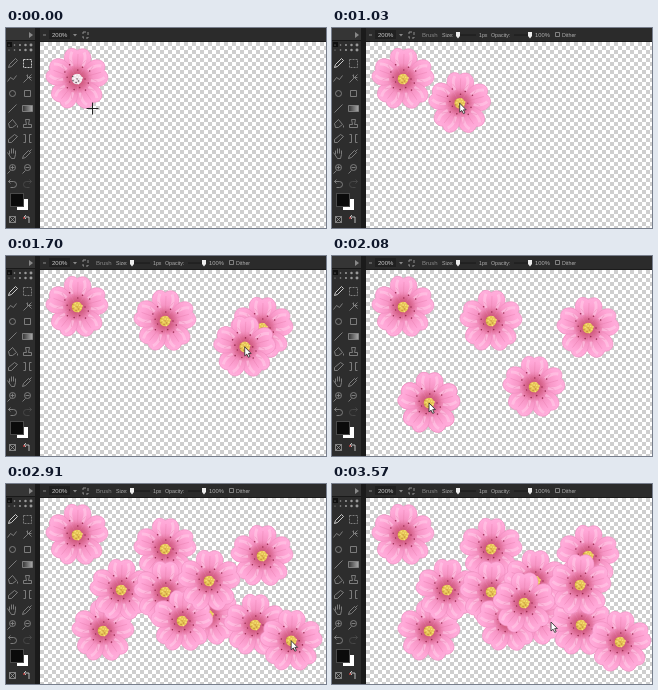
An HTML page with a canvas for the animation above (3600 ms loop, 320 by 200 pixels).

```html
<!DOCTYPE html>
<html lang="en">
<head>
<meta charset="utf-8">
<title>Flower brush</title>
<style>
html, body { margin: 0; width: 100%; height: 100%; overflow: hidden; background: #222; }
canvas { display: block; width: 320px; height: 200px; }
</style>
</head>
<body>
<canvas id="stage" width="320" height="200"></canvas>
<script>
const g = document.getElementById('stage').getContext('2d');
const LOOP = 3600, STEP = 74.4, PRESS = 260, RELEASE = 800, BRUSH = 960, END = 3560;
const LEFT = 34, TOP = 14, GOLDEN = 2.4;

// flowers in the order they are stamped; a marked one is only hovered
const spots = [
  [159, 65], [256, 72], [202, 131], [97, 147], [115, 106], [159, 108], [176, 137],
  [203, 97], [249, 141], [288, 158], [248, 101], [120, 83, 'hover'], [192, 119]
];
// the first stamps are slow, the rest come in a quick steady beat
const arrival = i => 2080 + (i - 3) * (i < 3 ? 240 : 140);
const opening = [[0, 87, 80], [PRESS, 35, 14], [670, 104, 76], [RELEASE, 104, 83]];
const stops = [...opening, ...spots.map(([x, y], i) => [arrival(i), x, y])];

const petal = new Path2D('M0 0C-4-6-15-13-13.5-23C-12-31-5-32-1-28.5C4-32 11-31 13-23C15-13 4-6 0 0Z');
const shine = new Path2D('M-6-27Q-9-21-5-13M6-27Q9-21 5-13');
const veins = new Path2D('M0-9V-25M-2-9Q-3-15-8-19M2-9Q3-15 8-19');
const arrow = new Path2D('M0 0V9L2.1 7.2L3.7 10.4L5.2 9.7L3.7 6.6H6.4Z');

// tool glyphs around their own centre, two per row
const lens = 'M3-1A3 3 0 1 1-3-1A3 3 0 1 1 3-1M-2 2L-5 5M-2-1H2';
const undo = 'M-4-2H1A3 3 0 0 1 1 4H-2M-2-4L-4-2L-2 0';
const glyphs = [
  'M-4 4L-3 1L3-5L5-3L-1 3Z', 'M-4-4H4V4H-4Z',
  'M-5 3L-2-1L1 1L4-3', 'M-4 4L4-4M-1-3L4 2M4-1H0V-4',
  'M-3 0A3 3 0 1 1 3 0A3 3 0 1 1-3 0', 'M-3-3H3V3H-3Z',
  'M-4 4L4-4', 'M-5-3H5V3H-5Z',
  'M-4 0L0-4L4 1L0 4H-3ZM5 2V4', 'M-4 4H4V1H1L2-4H-2L-1 1H-4Z',
  'M-4 4V1L2-4L5-2L-1 4Z', 'M-4-4H-2V4H-4M4-4H2V4H4',
  'M-5-1L-1 5H2L3 1V-3M-3 1V-3M-1 0V-5M1 0V-5', 'M-5 5L-4 2L1-3L3-1L-2 4ZM2-2L4-4',
  lens + 'M0-3V1', lens, undo, undo
].map(d => new Path2D(d));

function box(x, y, w, h, color) {
  g.fillStyle = color;
  g.fillRect(x, y, w, h);
}

function dot(x, y, r, color) {
  g.fillStyle = color;
  g.beginPath();
  g.arc(x, y, r, 0, 7);
  g.fill();
}

function stroke(shape, color, width = 1) {
  g.strokeStyle = color;
  g.lineWidth = width;
  g.stroke(typeof shape === 'string' ? new Path2D(shape) : shape);
}

function fill(shape, color) {
  g.fillStyle = color;
  g.fill(typeof shape === 'string' ? new Path2D(shape) : shape);
}

function label(s, x, size, color = '#b0b0b0') {
  g.font = size + 'px "Liberation Sans", sans-serif';
  g.fillStyle = color;
  g.fillText(s, x, 9);
}

function radial(r, ...colors) {
  const grad = g.createRadialGradient(0, 0, 0, 0, 0, r);
  colors.forEach((c, i) => grad.addColorStop(i / (colors.length - 1), c));
  return grad;
}

const petalFill = radial(32, '#c23c68', '#df7099', '#f796c6', '#ffa6d6', '#ffb0dd');
const heart = radial(13, '#c84a6c', '#d05c80bb', '#d9608e00');

function flower(x, y, yellow = true) {
  g.save();
  g.translate(x, y);
  for (let i = 0; i < 5; i++) {
    g.save();
    g.rotate(i * Math.PI * .4 + .04);
    fill(petal, petalFill);
    stroke(petal, '#ee8dbf', .6);
    stroke(shine, '#ffd0ea88', 3);
    stroke(veins, '#e276a688', .6);
    g.restore();
  }
  dot(0, 0, 13, heart);
  for (let i = 0; i < 13; i++) {
    const r = 8 + i * 5 % 9;
    dot(Math.cos(i * GOLDEN) * r, Math.sin(i * GOLDEN) * r, .8, '#9c2e54');
  }
  const [base, light, dark] = yellow ? ['#e6c455', '#f8e37c', '#c4913f'] : ['#eee4e8', '#fff', '#65515a'];
  dot(0, 0, 5.3, base);
  for (let i = 0; i < 14; i++) {
    const r = 1.45 * Math.sqrt(i);
    dot(Math.cos(i * GOLDEN) * r, Math.sin(i * GOLDEN) * r, .8, i % 3 ? light : dark);
  }
  g.restore();
}

// between two spots the pointer rests, travels, then rests again
function pointer(t) {
  if (t >= END) return [219, 138];
  const i = stops.findIndex(s => s[0] > t);
  if (i < 0) return stops.at(-1).slice(1);
  const [t0, x0, y0] = stops[i - 1], [t1, x1, y1] = stops[i];
  let u = (t - t0) / (t1 - t0);
  if (i > opening.length) u = Math.min(1, Math.max(0, (u - .25) * 1.5));
  return [x0 + (x1 - x0) * u, y0 + (y1 - y0) * u];
}

function checker() {
  box(LEFT, TOP, 286, 186, '#fff');
  for (let y = 0; y < 47; y++)
    for (let x = y % 2; x < 72; x += 2) box(LEFT + x * 4, TOP + y * 4, 4, 4, '#cecece');
}

function selection(x, y) {
  const w = x - 35, h = y - TOP;
  if (w < 2 || h < 2) return;
  const frame = `M35.5 14.5h${w}v${h}h${-w}Z`;
  stroke(frame, '#fff');
  g.setLineDash([2, 2]);
  stroke(frame, '#111');
  g.setLineDash([]);
  for (const i of [0, .5, 1])
    for (const j of [0, .5, 1])
      if (i !== .5 || j !== .5) box(Math.round(33.5 + w * i), Math.round(12.5 + h * j), 4, 4, '#080808');
}

function sidebar(brush) {
  box(0, 0, LEFT, 200, '#1b1b1b');
  box(0, 0, 29, 200, '#2d2d2d');
  box(0, 0, 29, 12, '#353535');
  box(0, 12, 29, 1, '#191919');
  fill('M23 4L27 7L23 10Z', '#888');
  box(1, 14, 5, 5, '#101010');
  for (let i = 0; i < 10; i++)
    dot(3 + i % 5 * 5.5, i < 5 ? 17 : 22, .6 + i % 5 * .22, '#999');
  glyphs.forEach((glyph, i) => {
    const active = i === (brush ? 0 : 1), redo = i === 17;
    g.save();
    g.translate(i % 2 ? 21.5 : 6.5, 35.5 + 15 * (i >> 1));
    if (redo) g.scale(-1, 1);
    if (i === 1) g.setLineDash([2, 1]);
    if (i === 7) {
      const ramp = g.createLinearGradient(-5, 0, 5, 0);
      ramp.addColorStop(0, '#333');
      ramp.addColorStop(1, '#aaa');
      fill(glyph, ramp);
    }
    stroke(glyph, active ? '#ddd' : redo ? '#4a4a4a' : '#858585', .9);
    g.restore();
  });
  box(11, 171, 11, 11, '#fff');
  box(4, 165, 14, 14, '#4a4a4a');
  box(5, 166, 12, 12, '#0b0b0b');
  stroke('M3.5 188.5h6v6h-6ZL9.5 194.5M9.5 188.5L3.5 194.5', '#999', .8);
  stroke('M18 189H23V195M20 187L18 189L20 191', '#ddd', .8);
  dot(18, 190, .9, '#c44');
}

function slider(x, end, value) {
  stroke(`M${x} 7H${end}`, '#191919');
  fill(`M${value - 2} 4h4v4l-2 2.5l-2-2.5Z`, '#eee');
}

function topBar(brush) {
  box(30, 0, 290, TOP, '#1b1b1b');
  box(LEFT, 0, 286, 13, '#2b2b2b');
  box(43, 2, 21, 9, '#202020');
  stroke('M37 7H40', '#888');
  label('200%', 46, 6, '#ccc');
  fill('M67 6H71L69 8.5Z', '#888');
  g.setLineDash([3, 2]);
  stroke('M77 4H82V10H77Z', '#999', .9);
  g.setLineDash([]);
  if (!brush) return;
  label('Brush', 90, 6, '#888');
  label('Size:', 110, 5.2);
  slider(124, 144, 126);
  label('1px', 147, 5.2);
  label('Opacity:', 159, 5.3);
  slider(182, 198, 198);
  label('100%', 203, 5.8);
  stroke('M223.5 4.5h4v4h-4Z', '#999', .8);
  label('Dither', 230, 5.3);
}

function cursor(x, y, t) {
  const cross = t < BRUSH;
  if (t >= PRESS && t < RELEASE) dot(x, y, 6, '#f4dc62cc');
  g.save();
  g.translate(cross ? Math.round(x) - .5 : x, cross ? Math.round(y) + .5 : y);
  if (!cross) fill(arrow, '#fff');
  stroke(cross ? 'M-6 0H6M0-6V6' : arrow, '#222', cross ? 1 : .8);
  g.restore();
}

function draw(now) {
  const t = Math.floor((now % LOOP + 20) / STEP) * STEP;
  const brush = t >= BRUSH, [x, y] = pointer(t);
  checker();
  flower(71, 51, t > 0);
  spots.forEach(([fx, fy, hover], i) => {
    if (!hover && t >= arrival(i)) flower(fx, fy);
  });
  if (brush && t < END) flower(x, y);
  sidebar(brush);
  topBar(brush);
  if (t >= PRESS && !brush) selection(Math.min(x, 103), Math.min(y, 75));
  cursor(x, y, t);
}

const start = performance.now();
function tick() {
  draw(performance.now() - start);
  requestAnimationFrame(tick);
}
tick();
</script>
</body>
</html>
```
